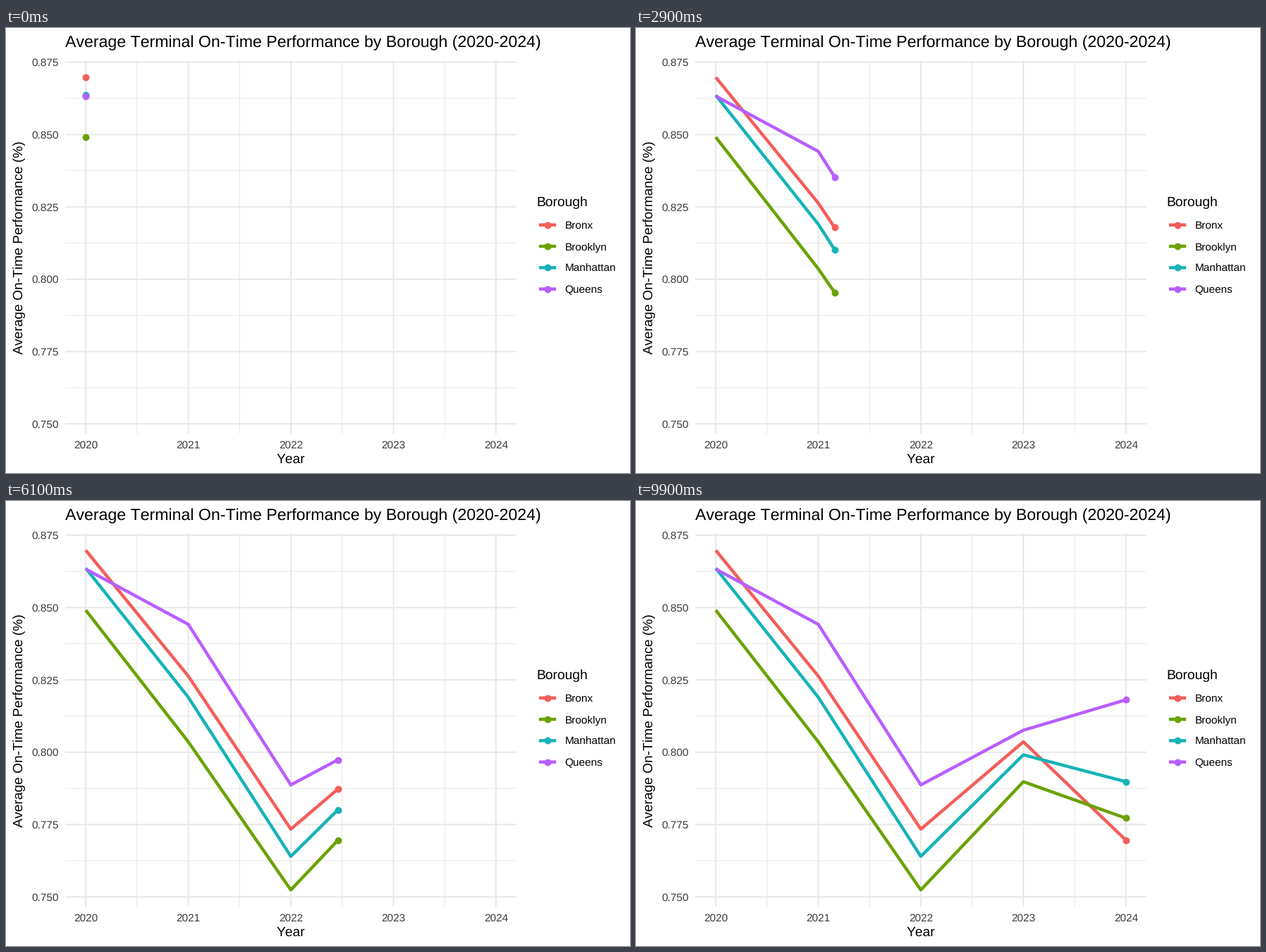
Recreate the animation shown at these times as a matplotlib script. Size 885x632 px, loop 10000 ms.

```python
import numpy as np
import matplotlib.pyplot as plt
from matplotlib.animation import FuncAnimation

W, H, DPI = 885, 632, 100
PT = 72 / DPI            # points per pixel
BASE = 19.3              # axis title size in pixels
SMALL, LARGE = 0.8 * BASE, 1.2 * BASE
GRID, TICK = "#e7e7e7", "#3a3a3a"

plt.rcParams.update({
    "font.family": "Liberation Sans",
    "text.hinting": "none",
    "text.kerning_factor": 6,
})

YEARS = np.arange(2020, 2025)
KEYS = [0, 25, 50, 74, 99]       # frame at which each year is reached
FRAMES = 100
SERIES = {
    "Bronx": ("#f35e5a", [0.8698, 0.8263, 0.7734, 0.8036, 0.7696]),
    "Brooklyn": ("#6ba204", [0.8491, 0.8036, 0.7524, 0.7898, 0.7772]),
    "Manhattan": ("#17b3b7", [0.8636, 0.8190, 0.7640, 0.7991, 0.7898]),
    "Queens": ("#b85eff", [0.8633, 0.8442, 0.7887, 0.8076, 0.8181]),
}
LEFT, RIGHT, TOP, BOTTOM = 84, 724, 46, 576.3


def px(year):
    return 113.1 + 145.43 * (np.asarray(year) - 2020)


def py(value):
    return 48.6 + (0.875 - np.asarray(value)) * 4109


fig = plt.figure(figsize=(W / DPI, H / DPI), dpi=DPI, facecolor="white")
ax = fig.add_axes([0, 0, 1, 1])
ax.set(xlim=(0, W), ylim=(H, 0))
ax.axis("off")


def text(x, y, s, size, color="black", ha="left", rotation=0):
    ax.text(x, y, s, fontsize=size * PT, color=color, ha=ha, va="baseline",
            rotation=rotation, rotation_mode="anchor")


def stroke(xs, ys, color, width, z):
    return ax.plot(xs, ys, color=color, lw=width * PT, zorder=z, snap=False,
                   solid_capstyle="butt", solid_joinstyle="round")[0]


def dot(x, y, color):
    return ax.plot([x], [y], "o", color=color, ms=9.9 * PT, mew=0,
                   zorder=4, snap=False)[0]


def grid(years, values, width):
    for x in px(years):
        stroke([x, x], [TOP, BOTTOM], GRID, width, 1)
    for y in py(values):
        stroke([LEFT, RIGHT], [y, y], GRID, width, 1)


ticks = 0.75 + 0.025 * np.arange(6)
grid(YEARS[:-1] + 0.5, ticks[:-1] + 0.0125, 0.94)
grid(YEARS, ticks, 1.87)

for year in YEARS:
    text(px(year), 596.6, str(year), SMALL, TICK, "center")
for v in ticks:
    text(75.2, py(v) + 5.5, f"{v:.3f}", SMALL, TICK, "right")

text(84, 27.2, "Average Terminal On-Time Performance by Borough (2020-2024)",
     LARGE)
text(404, 618.3, "Year", BASE, ha="center")
text(23.7, 311.2, "Average On-Time Performance (%)", BASE, ha="center",
     rotation=90)

text(752.6, 253, "Borough", BASE)
lines, dots = [], []
for i, (name, (color, values)) in enumerate(SERIES.items()):
    y = 279.7 + 30.33 * i
    stroke([755.9, 780.2], [y, y], color, 4.5, 3)
    dot(768, y, color)
    text(792.3, y + 5.6, name, SMALL)
    lines.append(stroke([], [], color, 4.5, 3))
    dots.append(dot(px(2020), py(values[0]), color))


def update(frame):
    now = np.interp(frame, KEYS, YEARS)
    past = YEARS < now
    for line, point, (_, values) in zip(lines, dots, SERIES.values()):
        x, y = px(now), py(np.interp(now, YEARS, values))
        line.set_data(np.append(px(YEARS[past]), x),
                      np.append(py(values)[past], y))
        point.set_data([x], [y])
    return lines + dots


anim = FuncAnimation(fig, update, frames=FRAMES, interval=100, repeat=True,
                     repeat_delay=0, blit=False)
plt.show()
```
